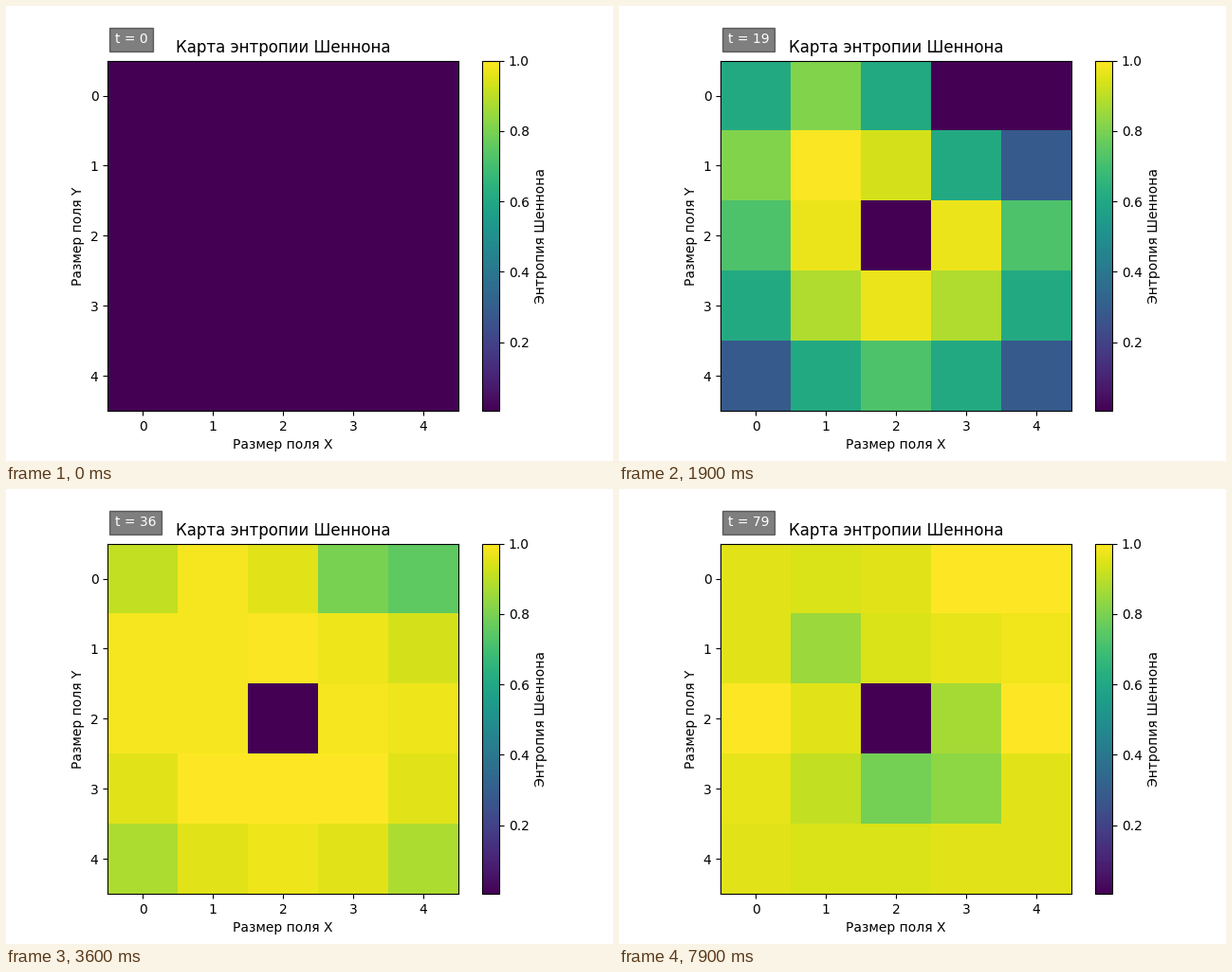
A matplotlib script that plays this animation: 640x480 px, repeating every 8 s.

```python
import numpy as np
import matplotlib.pyplot as plt
from matplotlib.animation import FuncAnimation

SIZE = 5
FRAMES = 80
MID = SIZE // 2

row, col = np.mgrid[:SIZE, :SIZE]
dist2 = (row - MID) ** 2 + (col - MID) ** 2


def spots(points, width):
    """Sum of round bumps given as (row, column, height)."""
    return sum(h * np.exp(-((row - r) ** 2 + (col - c) ** 2) / width)
               for r, c, h in points)


# Activity spreads from the centre, delayed or hastened around a few spots.
start = 10 + 0.85 * dist2 + spots(
    [(0.2, 3.2, 9), (0.6, 0.6, -5.5), (2.2, 2.2, -5)], width=1)
rate = 0.8 - 0.03 * dist2

# Each cell goes quiet for good after this many visits.
limit = 30 + spots(
    [(0, 3.5, 16), (2, 0, 11), (2, 4, 12),
     (1, 1, -8), (3, 1.7, -12), (2.5, 3, -14)], width=0.5)
limit[MID, MID] = 0


def visits(t):
    """Cumulative visit count of every cell at step t."""
    growth = rate * np.maximum(t - start, 0) + 0.2 * max(t - 36, 0)
    return np.floor(np.minimum(growth, limit) + 0.5)


def entropy(p):
    """Binary entropy in bits, zero at p = 0 and p = 1."""
    q = np.clip(p, 1e-12, 1 - 1e-12)
    return -q * np.log2(q) - (1 - q) * np.log2(1 - q)


def field(t):
    return entropy(visits(t) / (t + 1))


fig, ax = plt.subplots(figsize=(6.4, 4.8), dpi=100)
image = ax.imshow(field(0), cmap="viridis", vmin=0.005, vmax=1)
fig.colorbar(image, ax=ax, label="Энтропия Шеннона")
ax.set_title("Карта энтропии Шеннона")
ax.set_xlabel("Размер поля X")
ax.set_ylabel("Размер поля Y")
label = ax.text(-0.4, -0.75, "t = 0", color="white",
                bbox=dict(facecolor="black", alpha=0.5))


def update(t):
    image.set_data(field(t))
    label.set_text(f"t = {t}")
    return image, label


anim = FuncAnimation(fig, update, frames=FRAMES, interval=100,
                     repeat=True, repeat_delay=0)
plt.show()
```
